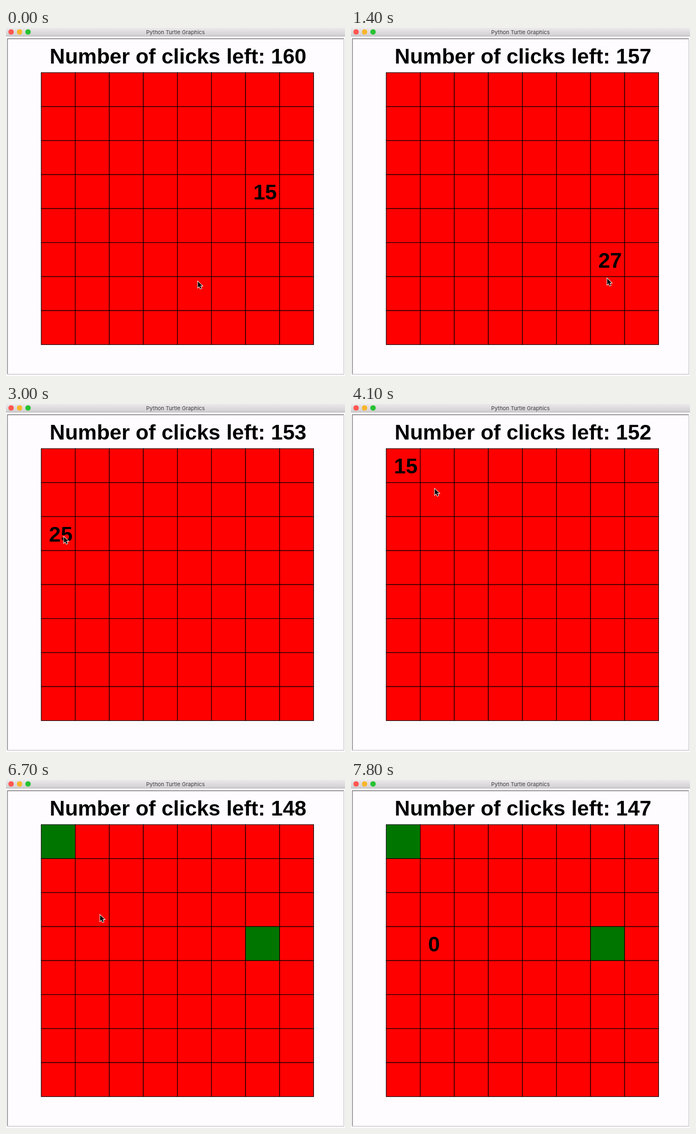
An HTML page that plays this animation: 600 px wide and 617 px high, repeating every 8 s.

```html
<!DOCTYPE html>
<html lang="en">
<head>
<meta charset="utf-8">
<title>Memory grid</title>
<style>
  html, body { margin: 0; width: 100%; height: 100%; overflow: hidden; background: #fff; }
  svg { display: block; width: 600px; height: 617px; }
  .big { font: bold 37.5px "Liberation Sans", Arial, sans-serif; fill: #000; }
  .bar { font: 9.6px Inter, sans-serif; fill: #3e3e3e; }
</style>
</head>
<body>
<svg viewBox="0 0 600 617">
  <defs>
    <linearGradient id="chrome" x1="0" y1="0" x2="0" y2="1">
      <stop offset="0" stop-color="#ebe9eb"/>
      <stop offset="1" stop-color="#d1cfd1"/>
    </linearGradient>
  </defs>
  <rect width="600" height="617" fill="#fefdfe"/>
  <rect width="600" height="14" fill="url(#chrome)"/>
  <rect y="14" width="600" height="1" fill="#b4b2b4"/>
  <circle cx="9" cy="7" r="4.8" fill="#fc5650"/>
  <circle cx="24" cy="7" r="4.8" fill="#fdb52c"/>
  <circle cx="39" cy="7" r="4.8" fill="#27c232"/>
  <text class="bar" x="300" y="10.5" text-anchor="middle">Python Turtle Graphics</text>
  <rect x="2" y="19" width="596" height="595" fill="#fefcff"/>
  <path d="M2.5 614V19H598" fill="none" stroke="#858385" stroke-width="1.4"/>
  <path d="M2 614H598V19" fill="none" stroke="#cfcdcf" stroke-width="1.4"/>
  <g id="board" stroke="#000"></g>
  <text id="title" class="big" x="77.3" y="62.8"></text>
  <text id="num" class="big"></text>
  <path id="arrow" d="M.5 .5V11.2L3 8.9L4.9 13.2L6.9 12.3L5 8.1H8.4Z" stroke="#fff" stroke-width="1.7" paint-order="stroke"/>
</svg>
<script>
const $ = id => document.getElementById(id);
const LOOP = 8000, TICK = 100, SIDE = 8, STEP = 60.28, GLIDE = 400;
const left = c => 62.3 + STEP * c;
const upper = r => 79.1 + STEP * r;

function set(el, attrs) {
  for (const k in attrs) el.setAttribute(k, attrs[k]);
}

const cells = Array.from({ length: SIDE * SIDE }, (_, i) => {
  const el = document.createElementNS('http://www.w3.org/2000/svg', 'rect');
  set(el, { x: left(i % SIDE), y: upper(Math.floor(i / SIDE)), width: STEP, height: STEP });
  $('board').append(el);
  return el;
});

// A hit opens a tile; a slow one leaves the board half drawn for one tick.
const hit = (t, c, r, n, slow) =>
  ({ t, c, r, n, slow, cell: r * SIDE + c, x: left(c + .48), y: upper(r + .55) });
const via = (t, x, y) => ({ t, x, y });

const stops = [
  hit(0, 6, 3, 15), via(0, 339, 449),
  hit(200, 4, 6, 30), hit(600, 4, 4, 24, true),
  hit(1200, 6, 5, 27), hit(1600, 6, 6, 10), hit(1900, 6, 7, 28), hit(2200, 6, 3, 15),
  via(2800, 99, 215), hit(2900, 0, 2, 25, true), via(3000, 102, 235), hit(3400, 0, 0, 15),
  hit(4400, 6, 4, 18), hit(4900, 4, 5, 21), via(5200, 454, 376), hit(5500, 6, 3, 15),
  hit(6400, 0, 0, 15), via(6700, 166, 239), hit(7000, 1, 3, 0, true), via(7500, 189.5, 483)
];
const hits = stops.filter(s => 'n' in s);

// Two equal numbers in a row on different tiles are a pair.
const isPair = (a, b) => a && a.n === b.n && a.cell !== b.cell;

function pointer(t) {
  const i = stops.findIndex(s => s.t > t);
  if (i < 0) return stops[stops.length - 1];
  const a = stops[i - 1], b = stops[i];
  const from = Math.max(a.t, b.t - GLIDE);
  const u = Math.max(0, (t - from) / (b.t - from)), e = u * u * (3 - 2 * u);
  return { x: a.x + (b.x - a.x) * e, y: a.y + (b.y - a.y) * e };
}

function draw(time) {
  const t = Math.floor(time / TICK) * TICK;
  const past = hits.filter(s => s.t <= t);
  const last = past[past.length - 1];
  const drawn = last.slow && t < last.t + TICK ? last.cell + 1 : cells.length;
  const solved = past.flatMap((s, i) => isPair(past[i - 1], s) ? [past[i - 1].cell, s.cell] : []);

  cells.forEach((el, i) => set(el, {
    fill: solved.includes(i) ? '#007600' : '#f00',
    visibility: i < drawn ? 'visible' : 'hidden'
  }));
  $('title').textContent = 'Number of clicks left: ' + (161 - past.length);
  $('num').textContent = solved.includes(last.cell) ? '' : last.n;
  set($('num'), { x: left(last.c) + 13.8, y: upper(last.r) + 44.1 });

  const p = pointer(t);
  set($('arrow'), {
    transform: `translate(${p.x} ${p.y})`,
    visibility: t < 7800 ? 'visible' : 'hidden'
  });
}

const start = performance.now();
function tick() {
  draw((performance.now() - start) % LOOP);
  requestAnimationFrame(tick);
}
tick();
</script>
</body>
</html>
```
